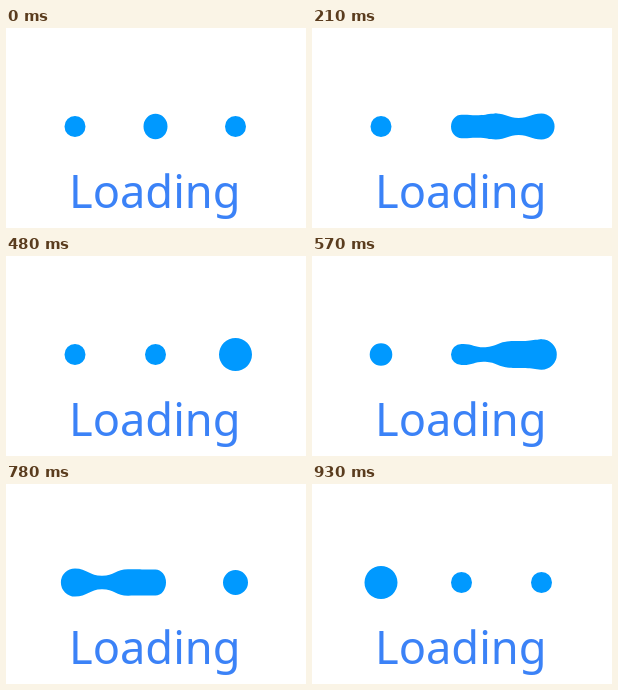
An HTML page for the animation above (960 ms loop, 300 px wide and 200 px high).

```html
<!DOCTYPE html>
<html lang="en">
<head>
<meta charset="utf-8">
<title>Loading</title>
<style>
html, body { margin: 0; width: 100%; height: 100%; overflow: hidden; background: #fff; }
svg { display: block; width: 100%; height: 100%; }
text { font: 45.2px "Noto Sans", "Open Sans", sans-serif; fill: #3b82f7; }
</style>
</head>
<body>
<svg viewBox="0 0 300 200">
  <path id="goo" fill="#0099ff"/>
  <text x="63" y="180.2">Loading</text>
</svg>
<script>
const LOOP = 960, STEP = 30;
const Y = 98.5, LEFT = 69, MID = 149.5, RIGHT = 229.5;
const BASE = 10.5, SWELL = 6;           // resting radius and growth at the mover
const NEAR = 30, THIN = 46, REACH = 58; // where a bridge starts to thin, how fast, where it snaps
const goo = document.getElementById("goo");

const mix = (a, b, p) => a + (b - a) * p;
const clamp = v => Math.min(1, Math.max(0, v));

function ball({ x, rx, ry }) {
  return `M${x - rx} ${Y}a${rx} ${ry} 0 1 1 ${2 * rx} 0a${rx} ${ry} 0 1 1 ${-2 * rx} 0Z`;
}

// Smooth body from the top of one ball to the next, pinched halfway as they part
function bridge(a, b) {
  if (a.x > b.x) [a, b] = [b, a];
  const d = b.x - a.x;
  if (d > REACH || d < 0.1) return "";
  const neck = (a.ry + b.ry) / 2 * (1 - clamp((d - NEAR) / THIN));
  const slope = (b.ry - a.ry) / d, arm = d / 4.4, cx = a.x + d / 2;
  const curve = side => {
    const at = (x, h, dx) => `${(x + dx).toFixed(2)} ${(Y + side * (h + slope * dx)).toFixed(2)} `;
    return [
      at(a.x, a.ry, 0), at(a.x, a.ry, arm), at(cx, neck, -arm), at(cx, neck, 0),
      at(cx, neck, arm), at(b.x, b.ry, -arm), at(b.x, b.ry, 0)
    ];
  };
  const top = curve(-1), low = curve(1).reverse();
  return `M${top[0]}C${top.slice(1).join("")}L${low[0]}C${low.slice(1).join("")}Z`;
}

function draw(ms) {
  const n = Math.max(0, Math.floor((ms % LOOP) / STEP) - 1);
  const out = clamp(n / 14), back = clamp((n - 15) / 15);
  const returning = n >= 15;
  const x = returning ? mix(RIGHT, LEFT, back) : mix(MID, RIGHT, out);
  const size = mix(12.8, 13.2, out);
  const mover = { x, rx: mix(12, 13.2, out), ry: size };

  // A dot touched by the mover is drawn up to its height
  const dot = (cx, swell) => {
    const r = BASE + SWELL * swell;
    const pull = clamp(1 - (Math.abs(cx - x) - 25) / 20);
    return { x: cx, rx: r, ry: Math.max(r, mix(BASE, size, pull)) };
  };
  const dots = [
    dot(LEFT, back ** 1.25),
    dot(MID, 0),
    dot(RIGHT, returning ? 1 - back : out)
  ];
  goo.setAttribute("d", [
    ...dots.map(ball), ball(mover), ...dots.map(d => bridge(d, mover))
  ].join(""));
}

const start = performance.now();
function tick() {
  draw(performance.now() - start);
  requestAnimationFrame(tick);
}
tick();
</script>
</body>
</html>
```
